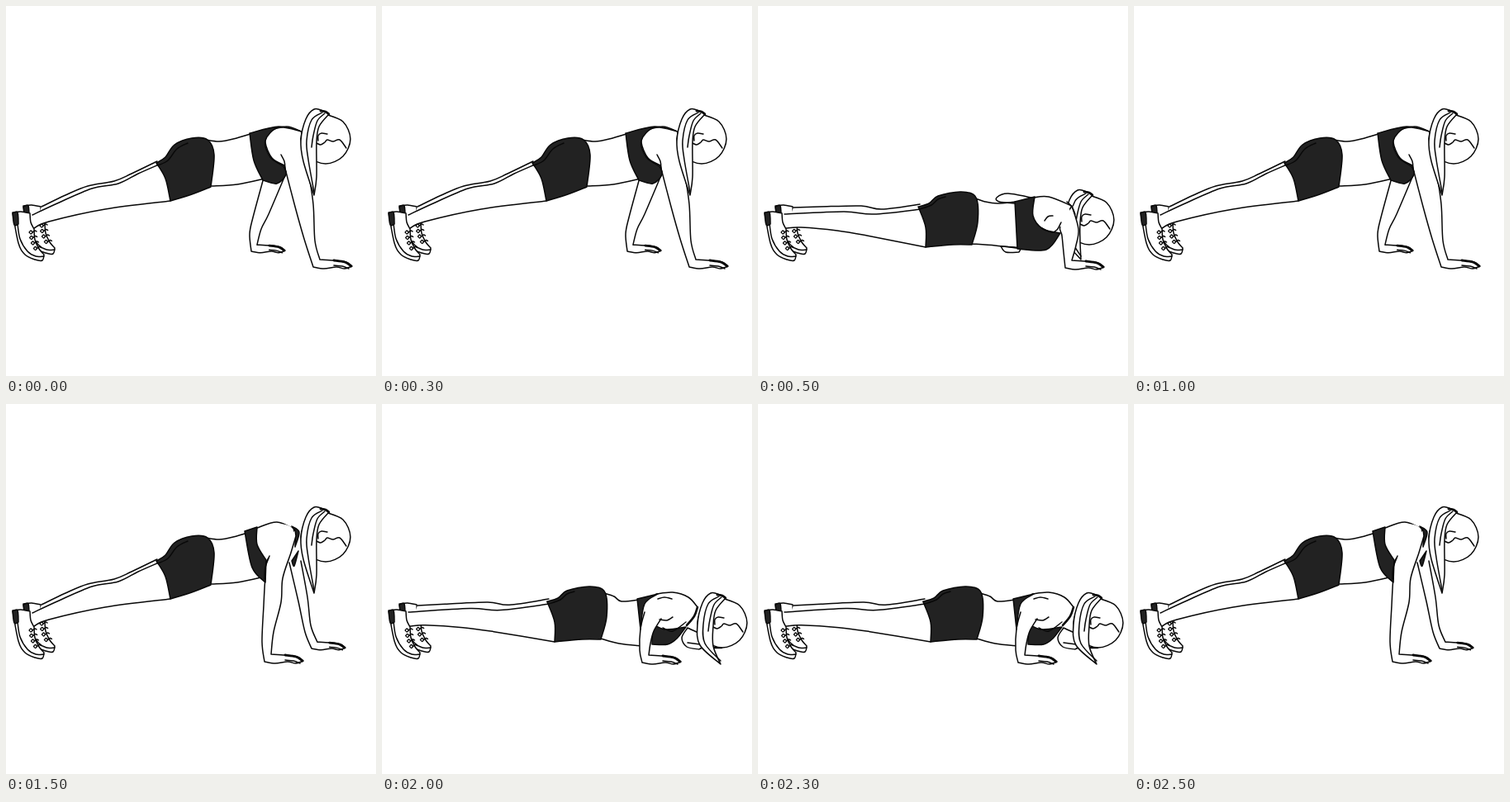
Animation of 448x448 px, one loop 3 s. Source, as an HTML page:

```html
<!DOCTYPE html>
<html lang="en">
<head>
<meta charset="utf-8">
<title>Push-up</title>
<style>
  html, body { margin: 0; width: 100%; height: 100%; overflow: hidden; background: #fff; }
  svg { display: block; width: 100vw; height: 100vh; }
  path { stroke: #080808; stroke-width: 1.5; stroke-linecap: round; stroke-linejoin: round; fill: none; }
  .skin { fill: #fff; }
  .cloth { fill: #222; }
  .blank { fill: #fff; stroke: none; }
  .pose { visibility: hidden; animation: 3s step-end infinite; }
  #wideUp { animation-name: wideUp; }
  #wideDown { animation-name: wideDown; }
  #closeUp { animation-name: closeUp; }
  #closeDown { animation-name: closeDown; }
  @keyframes wideUp {
    0%, 33.3333% { visibility: visible; }
    16.6667%, 50%, 100% { visibility: hidden; }
  }
  @keyframes wideDown {
    0%, 33.3333%, 100% { visibility: hidden; }
    16.6667% { visibility: visible; }
  }
  @keyframes closeUp {
    0%, 66.6667% { visibility: hidden; }
    50%, 83.3333%, 100% { visibility: visible; }
  }
  @keyframes closeDown {
    0%, 83.3333%, 100% { visibility: hidden; }
    66.6667% { visibility: visible; }
  }
</style>
</head>
<body>
<svg viewBox="0 0 448 448">
  <g class="pose" id="wideUp"></g>
  <g class="pose" id="wideDown"></g>
  <g class="pose" id="closeUp"></g>
  <g class="pose" id="closeDown"></g>
</svg>
<script>
const NS = 'http://www.w3.org/2000/svg';
let layer;

// Smooth curve through key points; "/" marks a sharp corner.
function curve(text) {
  let last, d = '';
  for (const part of text.split('/')) {
    const p = part.trim().split(/\s+/).map(s => s.split(',').map(Number));
    if (last) p.unshift(last);
    else d = 'M' + p[0];
    for (let i = 0; i < p.length - 1; i++) {
      const a = p[i - 1] || p[i], b = p[i], c = p[i + 1], e = p[i + 2] || c;
      const h1 = b.map((v, k) => v + (c[k] - a[k]) / 6);
      const h2 = c.map((v, k) => v - (e[k] - b[k]) / 6);
      d += `C${h1} ${h2} ${c}`;
    }
    last = p[p.length - 1];
  }
  return d;
}

function add(kind, text, width) {
  const el = document.createElementNS(NS, 'path');
  el.setAttribute('d', curve(text));
  el.setAttribute('class', kind);
  if (width) el.style.strokeWidth = width;
  layer.append(el);
}
const ink = (text, width) => add('', text, width);
const skin = text => add('skin', text);
const cloth = text => add('cloth', text);
const blank = text => add('blank', text);

const remap = (text, f) =>
  text.replace(/(-?[\d.]+),(-?[\d.]+)/g, (_, x, y) => f(+x, +y).join());
const place = (text, x, y, s = 1) => remap(text, (u, v) => [x + u * s, y + v * s]);

// Moves the hips while the feet stay planted.
const lean = (text, dx, dy) => remap(text, (x, y) => {
  const t = Math.min(1, Math.max(0, (x - 44) / 155));
  return [x + dx * t, y + dy * t];
});

function shoe(x, y) {
  const at = text => place(text, x, y);
  skin(at('8,250 18,249 29,251 / 30,262 34,270 / 35,283 40,294 46,301 / 44,308 35,307 23,301 15,287 8,250'));
  ink(at('14,264 17,282 26,297 36,303 46,303'));
  cloth(at('8,251 14,250 15,264 / 10,265 8,251'));
  for (let i = 0; i < 4; i++) {
    const u = 30 + i * i * 0.6, v = 274 + i * 6.5;
    ink(place('-2,0 0,-2 2,0 0,2 -2,0', x + u, y + v), 1.3);
    ink(place('2,0 5,-2 7,-1', x + u, y + v));
  }
}

function legs(far, near, low) {
  shoe(13, -8);
  blank(far + ' / ' + low);
  [far, near, low].forEach(line => ink(line));
  shoe(0, 0);
}

function arm(x, y, size, outer, inner) {
  const at = text => place(text, x, y, size);
  skin(outer + at(' 0,0 / 13,2 28,0 38,2 47,-1 / 40,-6 25,-8 8,-9 / ') + inner);
  ink(at('25,-8 38,-6 46,-1'), 2.8);
  ink(at('25,-2 35,-1 43,2'));
}

// Head around (x, y) with a ponytail hanging to a tip given from the centre.
function head(x, y, tipX, tipY) {
  const at = text => place(text, x, y);
  const r = 30;
  skin(at(`0,${-r} 21,-21 ${r},0 21,21 0,${r} -21,21 ${-r},0 -21,-21 0,${-r}`));
  ink(at('-9,2 -9,-4 -5,-7 2,-6'));
  ink(at('-11,5 -6,7 -1,4 2,1 9,3 17,1 25,11'));
  skin(at(`4,-30 -3,-34 -14,-36 -24,-24 -30,2 -27,27 ${tipX},${tipY} / -11,${tipY - 22} -11,4 -8,-15 4,-30`));
  ink(at(`-4,-32 -17,-23 -23,2 -21,25 ${tipX},${tipY - 4}`));
  ink(at('-1,-31 -10,-22 -15,-4 -17,10'));
  ink(at('-6,-34 0,-33 4,-30'), 2.8);
}

function raisedBody() {
  legs('43,243 72,229 99,218 131,212 152,203 183,188',
       '32,253 62,239 104,221 136,215 160,203 185,192',
       '199,236 120,246 52,261 34,269');
  blank('242,162 275,161 296,155 / 311,209 249,218 / 242,162');
  ink('242,162 258,164 275,161 302,153');
  ink('249,218 280,216 313,209');
  cloth('182,190 193,183 204,168 225,160 244,162 252,180 248,219 / 225,228 199,236 / 193,209 182,190');
  ink('184,193 196,187 207,173 220,166');
}

function loweredBody(dx, dy) {
  const at = text => lean(text, dx, dy);
  legs(at('43,244 75,243 125,242 150,246 196,240'),
       at('32,252 104,249 140,252 197,246'),
       at('203,292 132,278 96,272 52,268 34,269'));
  ink(at('263,233 275,237') + ' 290,239 312,237');
  ink(at('259,288') + ' 287,290 314,293');
  cloth(at('194,243 207,239 218,230 246,225 264,232 266,262 259,289 / 236,289 203,292 / 203,268 194,243'));
  ink(at('196,246 210,241 218,234 227,231'));
}

function wideUp() {
  arm(297, 297, 0.87, '312,208 299,256 295,276', '309,270 318,252 338,205');
  raisedBody();
  arm(372, 316, 1, '318,151 314,165 322,184 337,193 / 350,243 361,282',
      '374,284 372,240 366,200 358,152 / 340,146 318,151');
  cloth('295,154 330,146 358,152 / 330,147 314,163 320,183 336,194 / 339,204 328,215 311,211 / 300,187 295,154');
  ink('333,180 337,188 338,197');
  head(387, 161, -14, 68);
}

function wideDown() {
  skin('312,239 292,237 289,232 303,227 340,234');
  skin('294,291 300,298 316,298 / 316,293 294,291');
  loweredBody(0, 0);
  head(401, 259, -10, 48);
  blank('333,232 368,235 382,243 / 370,272 350,274 333,260 / 333,232');
  arm(372, 317, 1, '333,232 352,231 380,242 / 366,266 368,278 370,298',
      '385,290 388,270 380,242 / 352,231 333,232');
  blank('340,234 376,244 368,266 345,268 / 340,234');
  cloth('311,237 335,231 / 333,254 345,270 366,275 / 349,295 314,294 / 311,237');
  ink('344,269 355,274 362,271 367,262');
  ink('347,260 351,255 357,254');
  ink('374,237 380,243 384,252');
}

function closeUp() {
  raisedBody();
  arm(370, 296, 0.87, '343,192 354,239 362,276', '369,268 365,234 357,190');
  cloth('346,148 355,155 350,173 / 350,160 346,148');
  cloth('354,178 346,190 / 349,196 354,178');
  arm(313, 312, 1, '304,150 328,143 350,152 / 318,186 314,210 312,244 310,288',
      '324,276 333,240 335,211 345,180 351,160 / 350,152');
  blank('304,152 328,145 348,153 338,185 318,187 / 304,152');
  cloth('289,154 304,149 / 304,170 315,189 / 314,216 / 298,198 289,154');
  ink('313,212 314,198 319,184');
  head(387, 161, -14, 68);
}

function closeDown() {
  loweredBody(6, -4);
  skin('370,271 363,283 369,294 384,297 / 398,286 370,271');
  ink('370,289 385,291');
  blank('309,237 334,230 372,235 382,246 / 368,271 340,274 314,280 / 309,237');
  cloth('327,266 343,273 368,270 / 357,284 346,291 327,291 / 327,266');
  arm(315, 313, 1, '318,252 313,272 312,298', '325,290 329,275 338,260');
  cloth('309,236 334,230 / 318,242 313,273 / 309,236');
  ink('332,230 352,228 371,234 382,246');
  ink('382,246 378,257 369,268', 2.6);
  ink('336,261 345,262 352,258');
  ink('340,271 352,275 368,264');
  ink('334,236 342,234 351,236');
  ink('400,295 411,295', 2.6);
  head(412, 265, -2, 50);
}

for (const pose of [wideUp, wideDown, closeUp, closeDown]) {
  layer = document.getElementById(pose.name);
  pose();
}
</script>
</body>
</html>
```
